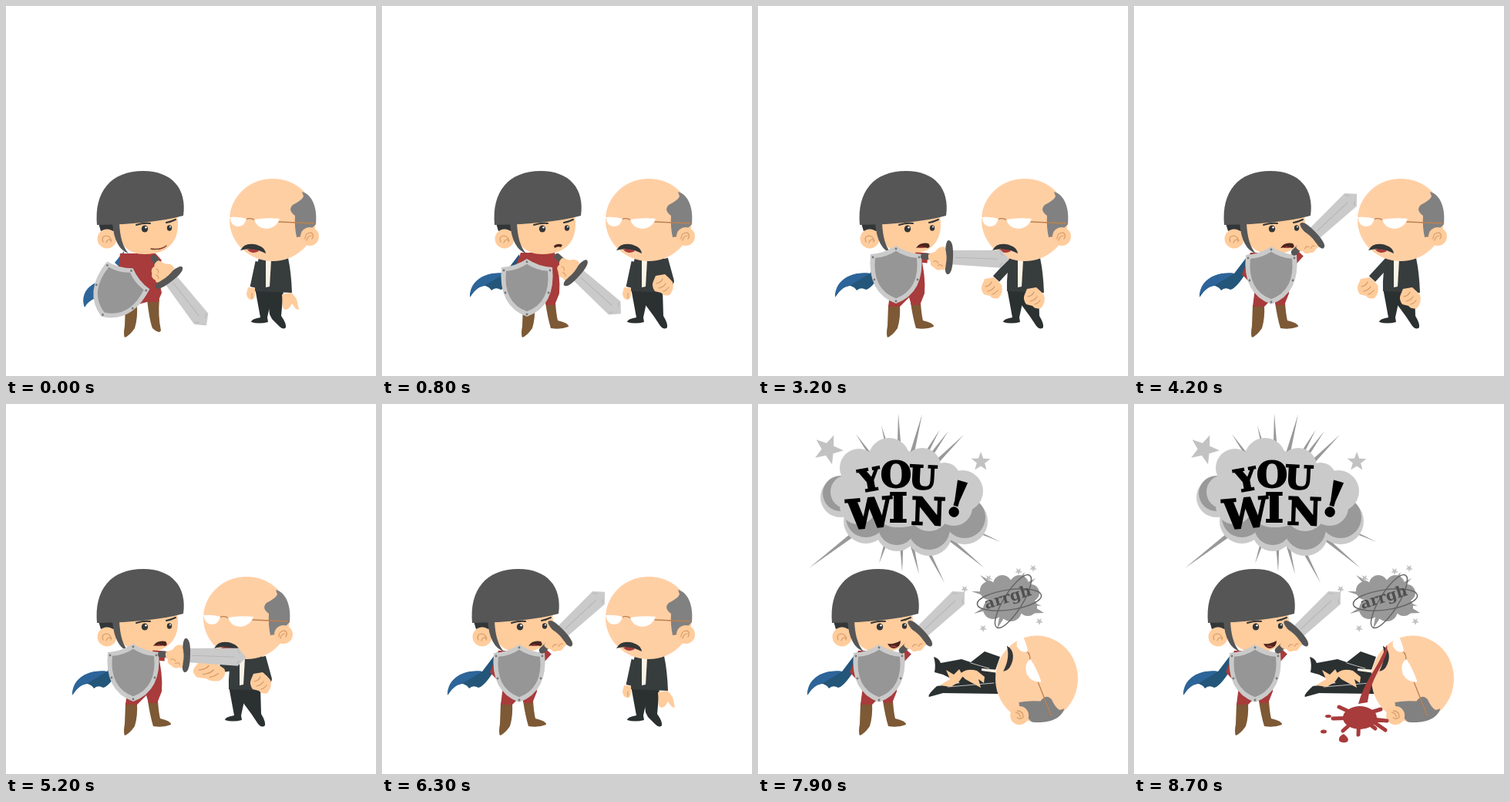
These frames come from a looping animation (480x480 px, 8.9 s). An HTML page:

```html
<!DOCTYPE html>
<html lang="en">
<head>
<meta charset="utf-8">
<style>
html, body { margin: 0; width: 100%; height: 100%; overflow: hidden; background: #fff; }
svg { display: block; width: 100vw; height: 100vh; }
text { font-family: "DejaVu Serif", serif; font-weight: bold; text-anchor: middle; }
</style>
</head>
<body>
<svg id="stage" viewBox="0 0 480 480"></svg>
<script>
const skin = '#ffcc9c', line = '#d39a66', red = '#a83b3b', iron = '#565656', steel = '#cacaca';
const suit = '#373c3d', pants = '#2b3031', boot = '#7d5935', mid = '#999', dark = '#333637';

const path = (d, fill) => `<path d="${d}" fill="${fill}"/>`;
const stroke = (d, color, width, cap = 'round') =>
  `<path d="${d}" fill="none" stroke="${color}" stroke-width="${width}" stroke-linecap="${cap}" stroke-linejoin="round"/>`;
const oval = (x, y, rx, ry, fill) => `<ellipse cx="${x}" cy="${y}" rx="${rx}" ry="${ry}" fill="${fill}"/>`;
const dot = (x, y, r, fill) => oval(x, y, r, r, fill);
const group = (transform, ...parts) => `<g transform="${transform}">${parts.join('')}</g>`;
const scaleAt = (x, y, s) => `translate(${x} ${y}) scale(${s}) translate(${-x} ${-y})`;

function star(x, y, r, turn) {
  const points = Array.from({ length: 10 }, (_, i) => {
    const a = turn + i * Math.PI / 5, d = i % 2 ? r * 0.42 : r;
    return `${x + d * Math.cos(a)} ${y + d * Math.sin(a)}`;
  });
  return path(`M${points.join('L')}Z`, '#c2c2c2');
}

function spikes(cx, cy, width, tips) {
  return tips.map(([x, y]) => {
    const d = Math.hypot(x - cx, y - cy), nx = (cy - y) / d * width, ny = (x - cx) / d * width;
    return path(`M${x} ${y}L${cx + nx} ${cy + ny}L${cx - nx} ${cy - ny}Z`, mid);
  }).join('');
}

// Sword guard and shield: position and angle. E is D with a smile.
const raised = { sword: [233, 297, -43], shield: [179, 350, 0] };
const knightPoses = {
  A: { sword: [212, 353, 52], shield: [144, 372, 33] },
  B: { sword: [224, 347, 42], shield: [160, 366, 0] },
  C: { sword: [234, 326, 2], shield: [165, 349, 0] },
  D: raised,
  E: raised
};

function shield([x, y, angle]) {
  const rim = 'M0-38Q15-28 33-27Q38 23 0 37Q-38 23-33-27Q-15-28 0-38Z';
  const rivets = [[0, -34], [-30, -23], [30, -23], [-28, 6], [28, 6], [0, 34]];
  return group(`translate(${x} ${y}) rotate(${angle})`,
    path(rim, steel), group('scale(.82)', path(rim, '#969696')),
    ...rivets.map(([a, b]) => dot(a, b, 1.4, '#777')));
}

function sword([x, y, angle]) {
  return group(`translate(${x} ${y}) rotate(${angle})`,
    path('M0-9L67-11.5L78 0L67 11.5L0 9Z', steel),
    stroke('M8 0H62M66-9L69-5M66 9L69 5', '#b5b5b5', 1),
    stroke('M-33 0H-5', iron, 8),
    path('M-2-22Q5-23 5 0Q5 23-2 22Q-6 20-5 0Q-6-20-2-22Z', iron),
    path('M-6-13Q-13-15-18-7L-27-3Q-28 4-24 6Q-25 12-19 14Q-15 19-9 16Q-4 19-4 10Q-2-1-6-13Z', skin),
    stroke('M-20 6Q-16 4-14 8M-14 11Q-10 9-8 12', line, 1));
}

const shout = path('M191 314Q196 306 207 308Q211 313 206 314Q199 312 191 314Z', '#4a2620') + path('M194 314Q199 310 203 314Z', red);
const mouths = {
  A: stroke('M188 315Q200 317 208 311', '#70402f', 1.3) + stroke('M198 316L206 313', red, 1),
  B: path('M195 311Q201 307 206 310L204 313Q200 311 196 314Z', '#4a2620'),
  C: shout,
  D: shout,
  E: path('M190 311Q199 312 207 307Q207 315 199 317Q193 317 190 311Z', '#4a2620') + path('M193 314Q199 312 203 315Q198 317 193 314Z', red)
};

function knight(pose, x) {
  const { sword: s, shield: sh } = knightPoses[pose], rest = pose === 'A';
  const sleeve = { A: 'M184 328L194 344', B: 'M190 327L204 336', C: 'M190 326L206 327' }[pose] || 'M205 332L216 320';
  const cape = rest
    ? path('M153 318L141 333L151 342ZM120 358C103 363 97 378 102 391Q106 383 118 378Z', '#2d659a')
    : path('M150 322L131 347C105 344 87 357 86 378C94 366 100 363 106 363Q112 365 114 369Q119 364 126 368Q135 366 150 340Z', '#24567a') +
      path('M131 347C105 344 86 357 86 377Q90 367 106 362Q120 354 131 347Z', '#2d659a');
  const legs = path('M155 388H170Q171 405 167 418Q160 428 154 430Q152 426 154 415Z', boot) +
    path(rest ? 'M183 380H199Q197 402 201 421Q199 426 190 418Q186 408 183 380Z'
      : 'M184 385H197Q198 400 200 408Q214 411 214 416Q204 420 191 418Q187 405 184 385Z', boot);
  const tunic = path(rest ? 'M148 321H194L202 330L195 340L202 372L197 384L183 384L160 390L146 340Z'
    : 'M152 320H196Q204 350 202 373L196 388H185L182 378L170 390H155L158 366L141 348Z', red);
  const head = [
    path('M120 282H145V292H123Z', dark),
    dot(131, 302, 12.5, skin),
    stroke('M126 306Q123 299 130 298Q137 299 136 306M130 307Q132 301 137 304', line, 1.2),
    path('M142 281L222 272C227 302 213 322 180 322C158 322 146 310 142 281Z', skin),
    path('M138 282L147 281Q148 309 159 321Q141 315 138 282Z', iron),
    path('M118 284C114 241 136 214 178 214C215 214 235 237 230 272Q190 283 118 284Z', iron),
    stroke('M169 284Q179 281 187 282M208 281Q214 280 220 277', dark, 2),
    oval(180, 289, 4.2, 4.5, dark), dot(181.5, 287.3, 1.2, '#fff'),
    oval(212, 288, 3.2, 3.7, dark), dot(213, 286.5, 1, '#fff'),
    mouths[pose]
  ];
  return group(`translate(${x} 0)`, cape, legs, tunic, ...head, stroke(sleeve, red, 13, 'butt'), shield(sh), sword(s));
}

const fist = (x, y, rx = 13, ry = 14) => group(`translate(${x} ${y}) scale(${rx / 13} ${ry / 14})`,
  path('M-9-12L3-14Q8-10 13-4Q16 5 9 13Q2 15-2 10L-10 8Q-15 1-12-5Z', skin),
  stroke('M-8-2Q-2-3 0-8M-5 4Q1 3 4-2M1 8Q5 7 8 3', line, 1.2));

const manHead =
  oval(346, 277.5, 56, 53.5, '#ffcfa4') +
  path('M384 241C399 245 404 265 402 283L396 289Q389 291 384 299L377 300Q374 286 375 272Q365 265 372 258Q384 252 386 247Z', '#818181') +
  dot(394, 299, 12, skin) +
  stroke('M388 302Q388 294 396 294Q400 297 397 302M390 304Q391 298 396 298', line, 1.2);
const lips = path('M313 316Q322 312 328 318Q319 323 313 316Z', red);
const mustache = path('M304 317Q309 307 322 309Q336 312 337 321Q329 317 323 316Q313 314 304 317Z', dark);
const glasses =
  stroke('M311 277Q317 274 323 278M354 280L400 282', '#bd804d', 1.3) +
  path('M290 274Q302 273 312 276Q310 286 300 286Q292 285 290 274Z', '#fff') +
  path('M322 277Q338 274 355 276Q351 288 338 289Q325 288 322 277Z', '#fff');

function man(pose, x) {
  const wide = pose !== 'I';
  const hanging = stroke('M328 332L321 365', suit, 9, 'butt') +
    path('M314 365L323 366Q324 378 320 381Q313 382 312 373Z', skin) + stroke('M319 373V379', line, 1);
  const guard = stroke('M366 328L374 357L366 367', suit, 10, 'butt') + fist(364, 362);
  const left = {
    I: hanging,
    G: hanging,
    P: stroke('M330 339L312 342', suit, 13, 'butt') + fist(297, 347, 20, 13),
    F: stroke('M331 330L309 354', suit, 11, 'butt') + fist(303, 366)
  };
  const right = {
    I: path('M358 374L370 372Q377 378 378 384L380 394L376 393L371 386L368 391Q362 397 359 391Z', skin),
    G: guard,
    P: guard,
    F: fist(358, 379)
  };
  return group(`translate(${x} 0)`,
    path('M323 366L347 367L339 404L340 410Q328 413 318 410Q318 406 330 404Z', pants),
    path(wide ? 'M335 366L364 368L365 402Q371 412 370 417Q366 421 361 415L353 403L342 388Z'
      : 'M338 366L360 368L357 402Q364 412 363 417Q360 421 354 415L345 406L342 400Z', pants),
    path('M328 327H366Q370 345 371 372L323 370Q322 345 328 327Z', suit),
    path('M337 328L344 330L342 364L337 365Z', '#fcf3e5'),
    left[pose], right[pose], manHead, lips, mustache, glasses);
}

const fallenMan = [
  path('M228 328Q235 330 237 336L264 331L276 335L294 321L314 328L308 345L312 376L240 375L222 380Q219 378 232 366L262 362L240 351L229 348Q231 338 228 328Z', pants),
  path('M290 343L312 345V349L290 346Z', '#fcf3e5'),
  stroke('M276 336L300 343M246 367L306 362', '#fff', 0.7),
  path('M244 345L254 351L261 344L266 353L260 361L250 367L236 365L249 357Z', skin),
  path('M262 350Q271 342 284 346L294 354L293 362L286 357L289 368L278 362L269 357Z', skin),
  group('translate(361.5 356.5) rotate(91) translate(-346 -277.5)', manHead, mustache),
  group('translate(356 347) rotate(66) translate(-338 -281)', glasses)
].join('');

const letter = (char, x, y, size, turn = 0) =>
  `<text transform="translate(${x} ${y}) rotate(${turn})" y="${size * 0.365}" font-size="${size}" stroke="#000" stroke-width="2">${char}</text>`;

const lobes = [[107, 121, 26], [140, 152, 29], [180, 164, 27], [222, 167, 30], [268, 152, 30]];
const winSign = [
  spikes(185, 122, 6, [[182, 12], [213, 13], [160, 28], [127, 39], [236, 33], [247, 35], [267, 40],
    [315, 179], [294, 213], [242, 232], [209, 221], [187, 218], [157, 207], [66, 213]]),
  star(91, 59, 20, 0.06), star(289, 75, 13, -0.3),
  ...lobes.map(c => dot(...c, steel)),
  ...lobes.map(([x, y, r]) => dot(x, y - 5, r - 3, mid)),
  ...[[131, 83, 25], [170, 71, 27], [213, 81, 24], [242, 96, 20], [265, 113, 27], [116, 114, 22],
    [130, 132, 24], [178, 132, 28], [222, 138, 27], [254, 134, 24], [185, 110, 50]].map(c => dot(...c, steel)),
  letter('Y', 145, 98, 40, -10), letter('O', 179, 91, 46), letter('U', 214, 95, 42, 3),
  letter('W', 145, 141, 53, -5), letter('I', 182, 134, 52), letter('N', 221, 139, 49, 2),
  letter('!', 259, 123, 62, 16)
].join('');

const ring = (x, y, turn, rx, ry) => group(`translate(${x} ${y}) rotate(${turn})`,
  `<ellipse rx="${rx}" ry="${ry}" fill="none" stroke="#666" stroke-width="1.5"/>`);
const groan = [
  spikes(326, 252, 8, [[277, 243], [288, 222], [312, 222], [346, 218], [360, 226], [280, 272], [310, 292], [368, 262]]),
  ...[[268, 240], [299, 226], [338, 217], [357, 213], [292, 291], [365, 282]].map(([x, y]) => star(x, y, 5, 0.3)),
  ...[[300, 242, 12], [317, 234, 12], [339, 234, 12], [354, 245, 11], [350, 263, 12], [328, 268, 14],
    [305, 266, 13], [326, 252, 24]].map(c => dot(...c, mid)),
  path('M350 258L371 271L345 272Z', mid),
  ring(326, 254, -8, 42, 13), ring(331, 256, -58, 40, 12),
  '<text transform="translate(326 257) rotate(-17)" font-size="20" fill="#505050">arrgh</text>'
].join('');

const blood = size => path('M328 313Q331 322 317 346Q305 368 303 387L291 389Q296 371 306 354Q318 336 328 313Z', red) +
  group(scaleAt(292, 406, size),
    oval(293, 407, 22, 15, red),
    stroke('M292 405L266 393M292 407L258 408M292 405L271 424M292 405L291 429M292 405L313 421M292 407L328 411M300 405L326 423M292 405L320 396', red, 5),
    oval(252, 405, 4, 2, red), oval(246, 425, 4, 2.5, red),
    path('M272 428Q280 434 277 438Q271 441 266 437Q265 431 272 428Z', red));

// One entry per step: pose letter followed by horizontal offset
const knightSteps = ('A0 A8 B14 B22 B28 B14 C0 C0 C0 C0 C0 C0 C0 C14 C28 C41 C14 D-1 D-1 D-1 D-1 D-1 C14 C28 D-1 ' +
  'D-1 C0 C0 D-1 D-1 D-1 D-1 C14 C28 C10 D-12 E-22').split(' ');
const manSteps = ('I0 I0 I0 G0 G0 G0 G0 G-10 P-22 P-34 P-34 P-34 F0 F0 F0 F0 F0 F0 F0 P-17 P-34 F0 F0 F0 G0 ' +
  'P-17 P-34 P-17 I0 I0 I0 I0 I0 I1 I2').split(' ');
const stage = document.getElementById('stage');
const FALL = manSteps.length;
let shown = -1;

function draw(step) {
  const k = knightSteps[Math.min(step, knightSteps.length - 1)], m = manSteps[step];
  const since = step - FALL;
  const win = [0, 0, 0.4, 0.75][since] ?? 1, spill = [0.4, 0.75, 1][since - 6];
  stage.innerHTML = [
    m ? man(m[0], +m.slice(1)) : fallenMan,
    since > 0 ? groan : '',
    since > 1 ? group(scaleAt(185, 122, win), winSign) : '',
    spill ? blood(spill) : '',
    knight(k[0], +k.slice(1))
  ].join('');
}

function tick(now) {
  const t = now % 8900;
  const step = t < 5900 ? Math.min(28, Math.floor(t / 200)) : 29 + Math.floor((t - 5900) / 200);
  if (step !== shown) draw(shown = step);
  requestAnimationFrame(tick);
}
tick(performance.now());
</script>
</body>
</html>
```
